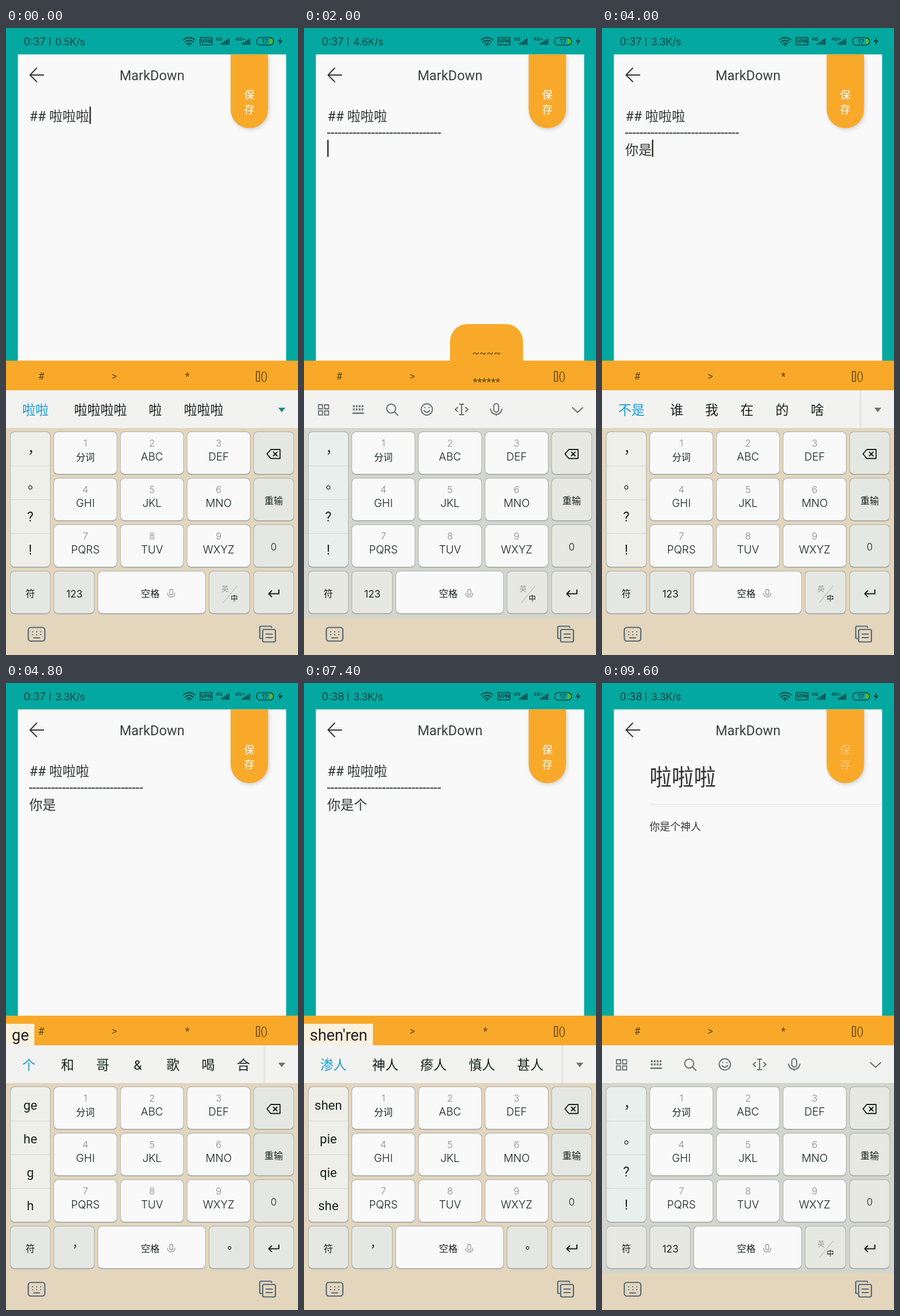
An HTML page that plays this animation: 504x1080 px, repeating every 9.8 s.

```html
<!DOCTYPE html>
<html lang="zh-CN">
<head>
<meta charset="utf-8">
<title>MarkDown</title>
<style>
html, body { margin: 0; width: 100%; height: 100%; overflow: hidden; background: #03a8a0; }
svg { display: block; width: 504px; height: 1080px; }
text { font-family: Roboto, "Noto Sans CJK SC", "Noto Sans CJK", sans-serif; white-space: pre; }
.status text, .cap { font-family: Inter, "Noto Sans CJK SC", "Noto Sans CJK", sans-serif; }
.line { fill: none; stroke-linecap: round; stroke-linejoin: round; }
.key { fill: #f9f9f9; }
.side { fill: #e5e8e2; }
.list { fill: #eeefe8; }
.tray { fill: #e3d6bd; }
.idle .tray { fill: #d2d6cf; }
.idle .side { fill: #e7e8e1; }
.idle .list { fill: #e8f0ee; }
.edge { fill: #98a4a9; }
.idle .edge { fill: #a3a59c; }
</style>
</head>
<body>
<svg id="stage" viewBox="0 0 504 1080" xmlns="http://www.w3.org/2000/svg">
  <defs>
    <clipPath id="candClip"><rect x="0" y="624" width="447" height="65"/></clipPath>
    <filter id="soft" x="-30%" y="-30%" width="160%" height="160%"><feGaussianBlur stdDeviation="3.5"/></filter>
  </defs>
  <rect width="504" height="1080" fill="#03a8a0"/>

  <g class="status" fill="#0b4240">
    <text id="clock" x="30.500" y="29.500" font-size="18"></text>
    <rect x="75" y="16" width="1.500" height="15"/>
    <text id="net" x="85" y="29.500" font-size="17"></text>
    <g class="line" stroke="#0b4240" stroke-width="1.900">
      <path d="M306 20.500Q316 12.500 326 20.500M309 24Q316 18.500 323 24M312 27.500Q316 24.500 320 27.500"/>
      <rect x="335" y="16.500" width="20.500" height="12.500" stroke-width="1.500"/>
      <rect x="432.500" y="16.500" width="29" height="13" rx="6" stroke-width="1.500"/>
    </g>
    <circle cx="316" cy="29.500" r="1.600"/>
    <text x="345.300" y="26.300" font-size="8.500" font-weight="700" text-anchor="middle">VPN</text>
    <text x="362" y="21.500" font-size="8" font-weight="700">4G</text>
    <text x="396" y="21.500" font-size="8" font-weight="700">4G+</text>
    <g id="bars"></g>
    <path d="M455 18.500h1.500a4.500 4.500 0 0 1 0 9H455z" fill="#5db52f"/>
    <text x="447" y="27" font-size="11" font-weight="600" text-anchor="middle">17</text>
    <path d="M474.500 16l-6 8h4l-1.500 6 6.500-8.500h-4.500z"/>
  </g>

  <rect x="20.500" y="45.500" width="463" height="528" fill="#f9f9f9"/>
  <path class="line" d="M65 81H42M53 69L41.500 81 53 92.500" stroke="#333" stroke-width="1.900"/>
  <text x="252" y="90" font-size="23.400" fill="#3b3f3e" text-anchor="middle">MarkDown</text>
  <path d="M388 46h64v94a32 32 0 0 1-64 0z" transform="translate(2 3)" fill="#000" opacity=".16" filter="url(#soft)"/>
  <path d="M387.700 45.500h64.600v94.800a32.300 32.300 0 0 1-64.600 0z" fill="#f8a92a"/>
  <g id="save" fill="#fff" font-size="18" font-weight="300" text-anchor="middle">
    <text x="420" y="122">保</text><text x="420" y="146.500">存</text>
  </g>

  <g id="editor" fill="#2e3231" font-size="23">
    <text id="row0" x="40.500" y="160"></text>
    <text id="row1" x="39.500" y="187.500"></text>
    <text id="row2" x="40" y="217.500"></text>
    <rect id="caret" width="2.600" height="29.500" fill="#3c3a30"/>
  </g>
  <g id="preview" fill="#333">
    <text x="82" y="176" font-size="38.200" font-weight="300">啦啦啦</text>
    <rect x="82" y="208.500" width="401" height="1.200" fill="#e6e6e6"/>
    <text x="82" y="254" font-size="17.800">你是个神人</text>
  </g>

  <rect y="573" width="504" height="51" fill="#f8a92a"/>
  <g font-size="17.500" fill="#5f4414" text-anchor="middle">
    <text x="61" y="606">#</text><text x="187" y="606">&gt;</text>
    <text x="313" y="606">*</text><text x="441" y="606">[]()</text>
  </g>
  <g id="popup" font-size="18.300" fill="#5f4414" text-anchor="middle">
    <path d="M252 210V30a30 30 0 0 1 30-30h66a30 30 0 0 1 30 30v180z" fill="#f8a92a"/>
    <text x="315" y="55.500">~~~~</text><text x="315" y="105.500">******</text><text x="315" y="152">------</text>
  </g>
  <g id="comp">
    <rect id="compBox" y="587" height="37" fill="#faf0dd"/>
    <text id="compText" x="10" y="615.500" font-size="27" fill="#222"></text>
  </g>

  <g id="board">
    <rect y="624" width="504" height="65" fill="#f2f2f1"/>
    <g id="cands">
      <g id="words" font-size="22.800" clip-path="url(#candClip)"></g>
      <rect id="sep" x="444" y="624" width="4" height="65" fill="#e7e8e6"/>
      <path id="more" d="M470 654h12l-6 8z"/>
    </g>
    <g id="tools" class="line" stroke="#687174" stroke-width="2">
      <path d="M25 649h7v7h-7zM35.500 649h7v7h-7zM25 659.500h7v7h-7zM35.500 659.500h7v7h-7z" stroke-width="1.800"/>
      <path d="M84.500 651.500h18M84.500 657h18" stroke-width="3.500" stroke-dasharray="3 2" stroke-linecap="butt"/>
      <path d="M84.500 663.500h18" stroke-width="2.500"/>
      <circle cx="150.500" cy="655.500" r="7.700"/><path d="M156.500 661.500l5.500 5.500"/>
      <circle cx="212" cy="657" r="9.700"/><path d="M207 659q5 6 10 0M208.500 653.500v.5M215.500 653.500v.5"/>
      <path d="M272 648v18M268.500 648h7M268.500 666h7M265 653.500l-4 3.500 4 3.500M279 653.500l4 3.500-4 3.500"/>
      <rect x="327.500" y="647" width="8.500" height="14.500" rx="4.200"/>
      <path d="M322 656.500q1.500 9 9.800 9t9.800-9M331.800 665.500v2"/>
      <path d="M463.500 654l8.700 8 8.700-8"/>
    </g>
    <rect y="689" width="504" height="391" fill="#e3d6bd"/>
    <rect class="tray" y="689" width="504" height="327"/>
    <g id="keys"></g>
    <path d="M8 754.500h68M8 812.500h68M8 870.500h68" stroke="#d3d7d0"/>
    <g id="side" fill="#16211f"></g>
    <g class="line" stroke="#18221f" stroke-width="2">
      <path d="M457 726h16v15.500h-16l-6.500-7.800zM461.500 730.500l6.500 6.500M468 730.500l-6.500 6.500" stroke-width="1.800"/>
      <path d="M471 968v6.500h-17M458.500 969.500l-5 5 5 5"/>
    </g>
    <g class="line" stroke="#999" stroke-width="1.300">
      <rect x="282.500" y="967" width="5.500" height="9.500" rx="2.700"/>
      <path d="M279 973.500q0 6.500 6.200 6.500t6.200-6.500"/>
    </g>
    <g id="latin">
      <text class="cap" x="118" y="980.500" font-size="17" text-anchor="middle" fill="#16211f">123</text>
      <path d="M375 990l24-29" stroke="#aaa"/>
      <text x="378" y="971" font-size="12.500" text-anchor="middle" fill="#999">英</text>
      <text x="394" y="987" font-size="12.500" font-weight="500" text-anchor="middle" fill="#111">中</text>
    </g>
    <g id="marks" fill="#16211f" font-size="20">
      <text x="114.500" y="972">，</text><text x="382" y="975">。</text>
    </g>
    <g class="line" stroke="#596a76" stroke-width="2.200">
      <rect x="38.500" y="1032.500" width="28.500" height="23.500" rx="4.500"/>
      <path d="M46 1040h.1M53 1040h.1M60 1040h.1M46 1045h.1M53 1045h.1M60 1045h.1M48 1050.500h10"/>
      <path d="M441 1051.500h-1.500q-1.500 0-1.500-1.500v-17.500q0-2 2-2h16.500q2 0 2 2"/>
      <rect x="443" y="1036" width="22" height="21.500" rx="2.500"/>
      <path d="M449 1044h10.500M449 1050h10.500"/>
    </g>
  </g>
</svg>

<script>
const $ = id => document.getElementById(id);
const NS = 'http://www.w3.org/2000/svg';
const LOOP = 9800, STEP = 200;

function add(parent, tag, attrs, content) {
  const el = document.createElementNS(NS, tag);
  for (const k in attrs) el.setAttribute(k, attrs[k]);
  if (content) el.textContent = content;
  parent.appendChild(el);
  return el;
}
const show = (id, on) => { $(id).style.display = on ? '' : 'none'; };

for (const x of [371, 407])
  for (let i = 0; i < 5; i++)
    add($('bars'), 'rect', { x: x + i * 3.1, y: 26 - i * 2, width: 2.1, height: 3 + i * 2 });

function key(x, y, w, h, kind, label, size = 16, num) {
  const keys = $('keys');
  add(keys, 'rect', { x: x - .7, y: y - .7, width: w + 1.4, height: h + 2.2, rx: 7, class: 'edge' });
  add(keys, 'rect', { x, y, width: w, height: h, rx: 6.5, class: kind });
  const mid = { x: x + w / 2, 'text-anchor': 'middle', class: 'cap' };
  const weight = /[A-Z0]/.test(label) ? 300 : 400;
  if (num) add(keys, 'text', { ...mid, y: y + 25, 'font-size': 16.5, 'font-weight': 300, fill: '#888' }, num);
  if (label) add(keys, 'text', { ...mid, y: y + (num ? 49 : 44), 'font-size': size, 'font-weight': weight, fill: '#16211f' }, label);
}
['分词', 'ABC', 'DEF', 'GHI', 'JKL', 'MNO', 'PQRS', 'TUV', 'WXYZ'].forEach((s, i) =>
  key(83 + i % 3 * 115, 696 + Math.floor(i / 3) * 80, 108, 72, 'key', s, i ? 18.7 : 16, i + 1));
key(8, 696, 68, 232, 'list');
key(428, 696, 68, 72, 'side');
key(428, 776, 68, 72, 'side', '重输');
key(428, 856, 68, 72, 'side', '0', 17);
key(8, 936, 68, 72, 'side', '符');
key(83, 936, 69, 72, 'side');
key(159, 936, 185, 72, 'key');
add($('keys'), 'text', { x: 249, y: 980, 'font-size': 16, 'text-anchor': 'middle', fill: '#16211f' }, '空格');
key(351, 936, 69, 72, 'side');
key(428, 936, 68, 72, 'side');

// Each entry changes part of the state from its time (ms) on.
const head = '## 啦啦啦', rule = '-'.repeat(31);
const steps = [
  [0, { clock: '0:37', net: '0.5K/s', rows: [head], edit: 0, pop: 0, comp: '', side: '',
        cands: '啦啦 啦啦啦啦 啦 啦啦啦', sep: 0, preview: 0, save: 1 }],
  [800, { pop: 70 }],
  [1000, { pop: 160 }],
  [1200, { pop: 200 }],
  [1400, { net: '4.6K/s' }],
  [1800, { rows: [head, rule, ''], edit: 1800, cands: '', pop: 180 }],
  [2000, { pop: 114 }],
  [2200, { pop: 0 }],
  [2600, { comp: 'n', side: 'm n o', cands: '你 吗 哦 那 嗯 没 年', sep: 1 }],
  [2800, { comp: 'ni', side: 'mi ni m n', cands: '你 米 呢 密 迷 泥 尼' }],
  [3000, { comp: "ni's", cands: '你是 你去 你说 觅食 你睡' }],
  [4000, { comp: '', side: '', rows: [head, rule, '你是'], edit: 4000, cands: '不是 谁 我 在 的 啥', net: '3.3K/s' }],
  [4400, { comp: 'g', side: 'g h i', cands: '个 和 好 给 过 还 会' }],
  [4600, { comp: 'ge', side: 'ge he g h', cands: '个 和 哥 & 歌 喝 合' }],
  [5600, { comp: '', side: '', rows: [head, rule, '你是个'], edit: 5600, cands: '啥 好人 人 屁 红枣 月 你' }],
  [6200, { comp: 's', side: 'p q r s', cands: '是 去 人 跑 说 请 让', clock: '0:38' }],
  [6400, { comp: 'sh', side: 'pi qi p q', cands: '是 起 其 时 皮 气 事' }],
  [6600, { comp: 'she', side: 'pie qie she p', cands: '些 切 设 社 蛇 且 别' }],
  [6800, { comp: 'shen', side: 'shen pie qie she', cands: '神 深 身 什 甚 肾 审' }],
  [7000, { comp: "shen'r", cands: '深入 神人 渗入 深热' }],
  [7200, { comp: "shen'ren", cands: '渗人 神人 瘆人 慎人 甚人' }],
  [7800, { comp: '', side: '', rows: [head, rule, '你是个神人'], edit: 7800, cands: '啊 吧 吗 的 呀 了' }],
  [8600, { cands: '' }],
  [9000, { preview: 1 }],
  [9400, { save: .65 }],
  [9600, { save: .35 }]
];

function drawWords(list) {
  const box = $('words');
  box.textContent = '';
  let x = 28;
  list.forEach((w, i) => {
    const wide = w.length * 22.7;
    add(box, 'text', w === '&'
      ? { x: x + wide / 2, y: 666, 'text-anchor': 'middle', fill: '#17211f' }
      : { x, y: 666, fill: i ? '#17211f' : '#159bd7' }, w);
    x += wide + (i ? 38 : 44);
  });
}

function drawSide(names) {
  const box = $('side');
  box.textContent = '';
  if (names) {
    names.split(' ').forEach((s, i) =>
      add(box, 'text', { x: 42, y: 735 + i * 57.8, 'font-size': 22, 'text-anchor': 'middle' }, s));
    return;
  }
  [['，', 37.5, 732], ['。', 37.5, 793], ['?', 36.5, 850], ['!', 39, 907]].forEach(([s, x, y]) =>
    add(box, 'text', { x, y, 'font-size': 23 }, s));
}

function render(t) {
  const s = {};
  for (const [at, change] of steps) if (at <= t) Object.assign(s, change);

  $('clock').textContent = s.clock;
  $('net').textContent = s.net;
  show('editor', !s.preview);
  show('preview', s.preview);
  $('save').setAttribute('opacity', s.save);

  for (let i = 0; i < 3; i++) $('row' + i).textContent = s.rows[i] || '';
  const last = s.rows.length - 1, caret = $('caret');
  caret.setAttribute('x', last ? 40 + s.rows[last].length * 23 : 144);
  caret.setAttribute('y', last ? 192.5 : 135.5);
  show('caret', Math.floor((t - s.edit) / 500) % 2 === 0);

  show('popup', s.pop);
  $('popup').setAttribute('transform', `translate(0 ${624 - s.pop})`);

  show('comp', s.comp);
  $('compText').textContent = s.comp;
  if (s.comp) $('compBox').setAttribute('width', $('compText').getComputedTextLength() + 19.5);

  $('board').classList.toggle('idle', !s.cands);
  show('tools', !s.cands);
  show('cands', s.cands);
  show('sep', s.sep);
  $('more').setAttribute('fill', s.sep ? '#6d7375' : '#1d8a80');
  drawWords(s.cands ? s.cands.split(' ') : []);
  drawSide(s.side);
  show('latin', !s.comp);
  show('marks', s.comp);
}

const start = performance.now();
let shown = -1;
function tick(now) {
  const t = Math.floor(Math.max(0, now - start) % LOOP / STEP) * STEP;
  if (t !== shown) render(shown = t);
  requestAnimationFrame(tick);
}
tick(start);
</script>
</body>
</html>
```
